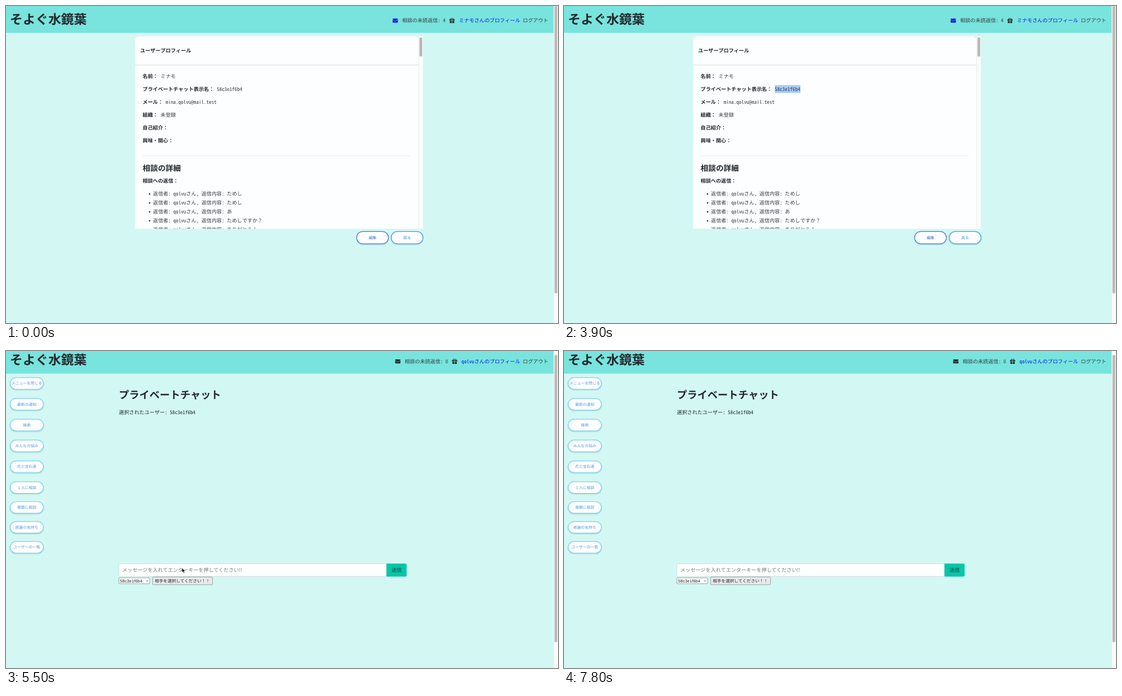
Animation of 988x567 px, one loop 8000 ms. Source, as an HTML page:

```html
<!DOCTYPE html>
<html lang="ja">
<head>
<meta charset="utf-8">
<style>
  html, body { margin: 0; width: 100%; height: 100%; overflow: hidden; background: #d3f8f4; }
  svg { display: block; }
  text {
    font-family: "Noto Sans Mono CJK JP", "Noto Sans CJK JP", "Noto Sans CJK", monospace;
    white-space: pre;
    text-rendering: geometricPrecision;
  }
  .ui { font-family: "Noto Sans CJK JP", "Noto Sans CJK", sans-serif; }
  .num { font-family: "Liberation Sans", sans-serif; }
  .bold { font-weight: 700; }
  .pill { filter: drop-shadow(0 1.5px 1px rgba(0, 60, 80, .25)); }
  .popup { filter: drop-shadow(0 2px 4px rgba(0, 0, 0, .35)); }
</style>
</head>
<body>
<svg id="stage" width="988" height="567" viewBox="0 0 988 567"></svg>
<script>
const EM = 9.15;
const INK = '#22282e', GREY = '#363c42', LINK = '#0a14f0';
const SITE = 'そよぐ水鏡葉', PERSON = 'ミナモ', HANDLE = 'qolvu';
const IDS = ['58c3e1f6b4', 'e417a6c92f', '92fb581e07'];

// y is the vertical middle of the characters
const text = (x, y, str, { size = EM, fill = INK, cls = '', anchor = 'start' } = {}) =>
  `<text x="${x}" y="${y + size * .36}" font-size="${size}" fill="${fill}" class="${cls}" text-anchor="${anchor}">${str}</text>`;
const bold = (x, y, str, size = EM) => text(x, y, str, { size, cls: 'bold' });
const rect = (x, y, w, h, fill, extra = '') =>
  `<rect x="${x}" y="${y}" width="${w}" height="${h}" fill="${fill}" ${extra}/>`;

const pill = (x, y, w, h, label, stroke, fill) =>
  rect(x, y, w, h, '#fdfeff', `rx="${h / 2}" stroke="${stroke}" stroke-width="1.15" class="pill"`) +
  text(x + w / 2, y + h / 2, label, { size: 6.86, fill, cls: 'ui', anchor: 'middle' });

const envelope = (x, y, fill) =>
  `<g transform="translate(${x} ${y})">${rect(0, 0, 9.4, 7.2, fill, 'rx="1"')}
   <path d="M0 1.7L4.7 5L9.4 1.7" fill="none" stroke="#78e4dd" stroke-width=".7"/></g>`;

const gift = (x, y) =>
  `<g transform="translate(${x} ${y})" fill="${INK}">
   <path d="M0 2.6H4.1V5H0zM5 2.6H9.2V5H5zM.6 5.7H4.1V9.3H.6zM5 5.7H8.6V9.3H5z"/>
   <path d="M4.6 2.6C3.6 -.2 1.6 .2 1.9 2.4M4.6 2.6C5.6 -.2 7.6 .2 7.3 2.4" fill="none" stroke="${INK}" stroke-width="1"/></g>`;

const chrome = (bottom, scroll, unread, user, navX, iconFill) => {
  const y = bottom - 22;
  return rect(0, 0, 980, bottom, '#78e4dd') +
    bold(7, bottom - 24.3, SITE, 22.9) +
    envelope(navX - 17, y - 3.5, iconFill) +
    text(navX, y, `相談の未読返信: ${unread}`, { fill: GREY }) +
    gift(navX + 84.7, y - 4.8) +
    text(920.3, y, `${user}さんのプロフィール`, { fill: LINK, anchor: 'end' }) +
    text(925, y, 'ログアウト', { fill: GREY }) +
    rect(980, 0, 8, 567, '#fafafa') +
    rect(980, 0, .6, 567, '#e4e8e8') +
    rect(981.7, scroll, 5, 514, '#bababa', 'rx="2.5"');
};

const profileRows = [
  ['名前：', PERSON], ['プライベートチャット表示名：', IDS[0]], ['メール：', `mina.${HANDLE}@mail.test`],
  ['組織：', '未登録'], ['自己紹介：', ''], ['興味・関心：', '']
].map(([label, value], i) => {
  const y = 125.5 + i * 22.95;
  return bold(244.5, y, label) + text(244.5 + (label.length + .5) * EM, y, value, { fill: GREY });
}).join('');

const replies = ['ためし', 'ためし', 'あ', 'ためしですか？', 'ありがとう！'].map((reply, i) => {
  const y = 335.5 + i * 16;
  return `<circle cx="257" cy="${y + .7}" r="1.3" fill="${INK}"/>` +
    text(263, y, `返信者: ${HANDLE}さん, 返信内容: ${reply}`, { fill: GREY });
}).join('');

const profilePage = chrome(48, 0, 4, PERSON, 709, LINK) +
  `<clipPath id="card"><rect x="231" y="54" width="515" height="344.5"/></clipPath>
  <g clip-path="url(#card)">
    ${rect(738.5, 54, 7.5, 380, '#fafcfc')}
    ${rect(231, 54.5, 507.5, 380, '#fdfeff', 'rx="7"')}
    ${rect(738.2, 54, .8, 345, '#e3e8e8')}
    ${rect(231, 104.6, 507.5, 2, '#e9ebec')}
    ${rect(740, 56, 5, 34.5, '#b9b9b9', 'rx="2.5"')}
    ${bold(240, 79.5, 'ユーザープロフィール')}
    <g id="selection">${rect(377.3, 141.5, 46, 14, '#a5cdfb')}</g>
    ${profileRows}
    ${rect(244.5, 267.5, 479.5, 1, '#ebeced')}
    ${bold(244.5, 290.2, '相談の詳細', 13.7)}
    ${bold(244.5, 312.5, '相談への返信：')}
    ${replies}
  </g>` +
  pill(627.6, 403.3, 56.8, 22, '編集', '#4a78d4', '#3f74d0') +
  pill(689.5, 403.3, 56.8, 22, '戻る', '#459ce0', '#3c9ae6');

const menu = ['メニューを閉じる', '最新の通知', '検索', 'みんなの悩み', '花と宝石達', '１人に相談',
  '複数に相談', '感謝の気持ち', 'ユーザーの一覧'];
const sidebar = menu.map((label, i) =>
  pill(7.6, 47.6 + i * 37.25 - Math.max(0, i - 5) * 1.65, 59.2, 20.6, label, '#7fd3ee', '#5b97e0')).join('');

const composer =
  rect(202, 380.6, 479, 22.6, '#fdfefe', 'rx="2" stroke="#c9d3d6" stroke-width=".8"') +
  text(208, 392, 'メッセージを入れてエンターキーを押してください!!', { fill: '#777d80', cls: 'ui' }) +
  '<path d="M681 380.3H715a2 2 0 0 1 2 2V401.6a2 2 0 0 1 -2 2H681z" fill="#06c5a9"/>' +
  text(699, 392, '送信', { fill: '#17413f', cls: 'ui', anchor: 'middle' }) +
  rect(202, 405.8, 55.2, 10.4, '#fdfefe', 'rx="1" stroke="#858b8b" stroke-width=".8"') +
  text(204, 411, IDS[0], { size: 7.63, cls: 'num' }) +
  '<path d="M250.6 410.2l1.9 1.9l1.9 -1.9" fill="none" stroke="#333" stroke-width=".8"/>' +
  rect(262.4, 404.2, 107.2, 13.8, '#e8eaeb', 'rx="1" stroke="#858b8b" stroke-width=".8"') +
  text(266.3, 411, '相手を選択してください！！', { size: 7.63, cls: 'ui' });

const popup = rect(197, 381.5, 69, 43.5, '#d8dcdc', 'rx="3" class="popup"') +
  rect(199, 384.5, 63.5, 12.8, '#3e8bf9', 'rx="2"') +
  '<path d="M203.4 391.2l1.7 2.3l3 -5" fill="none" stroke="#fff" stroke-width="1"/>' +
  IDS.map((id, i) => text(210, 391 + i * 12.6, id, { size: 8, cls: 'num', fill: i ? INK : '#fff' })).join('');

const chatPage = chrome(40.5, 7, 0, HANDLE, 713.6, INK) + sidebar +
  bold(202, 78, 'プライベートチャット', 18.3) +
  `<g id="chosen">${text(202, 109.5, `選択されたユーザー: ${IDS[0]}`)}</g>
   <g id="composer">${composer}</g><g id="popup">${popup}</g>`;

document.getElementById('stage').innerHTML = rect(0, 0, 988, 567, '#d3f8f4') +
  `<g id="profile">${profilePage}</g><g id="chat">${chatPage}</g>
  <g id="cursor">
    <path id="arrow" d="M0 0V8.2L1.9 6.5L3.2 9.4L4.6 8.8L3.3 6H5.8z" fill="#111" stroke="#fff" stroke-width=".6"/>
    <path id="beam" d="M-1.8 -5Q0 -5 0 -3.8Q0 -5 1.8 -5M0 -4V4M-1.8 5Q0 5 0 3.8Q0 5 1.8 5" fill="none" stroke="#333" stroke-width=".9"/>
  </g>`;

const $ = id => document.getElementById(id);
const show = (id, on) => $(id).setAttribute('display', on ? 'inline' : 'none');

// time, x, y
const path = [
  [0, 330, 580], [100, 330, 580], [900, 392, 190], [1400, 371, 146], [1800, 376, 145], [3200, 376, 145],
  [3600, 376, -20], [4000, 250, -20], [4400, 230, 387], [4900, 230, 387], [5400, 315, 388],
  [5600, 315, 388], [6100, 330, -20], [8000, 330, -20]
];

function cursorAt(t) {
  const i = path.findIndex(p => p[0] > t);
  const [t0, x0, y0] = path[i - 1], [t1, x1, y1] = path[i];
  const u = (t - t0) / (t1 - t0), k = u * u * (3 - 2 * u);
  return [x0 + (x1 - x0) * k, y0 + (y1 - y0) * k];
}

function draw(now) {
  const t = Math.floor(now % 8000 / 100) * 100;
  const sent = t >= 5500, overText = t >= 1700 && t < 3300;
  show('profile', t < 4000);
  show('chat', t >= 4000);
  show('selection', t >= 2000);
  show('popup', t >= 4500 && t < 4900);
  show('chosen', sent);
  $('composer').setAttribute('transform', `translate(0 ${sent ? 0 : -20.6})`);
  show('arrow', !overText);
  show('beam', overText);
  $('cursor').setAttribute('transform', `translate(${cursorAt(t)})`);
}

const start = performance.now();
(function tick() {
  draw(performance.now() - start);
  requestAnimationFrame(tick);
})();
</script>
</body>
</html>
```
